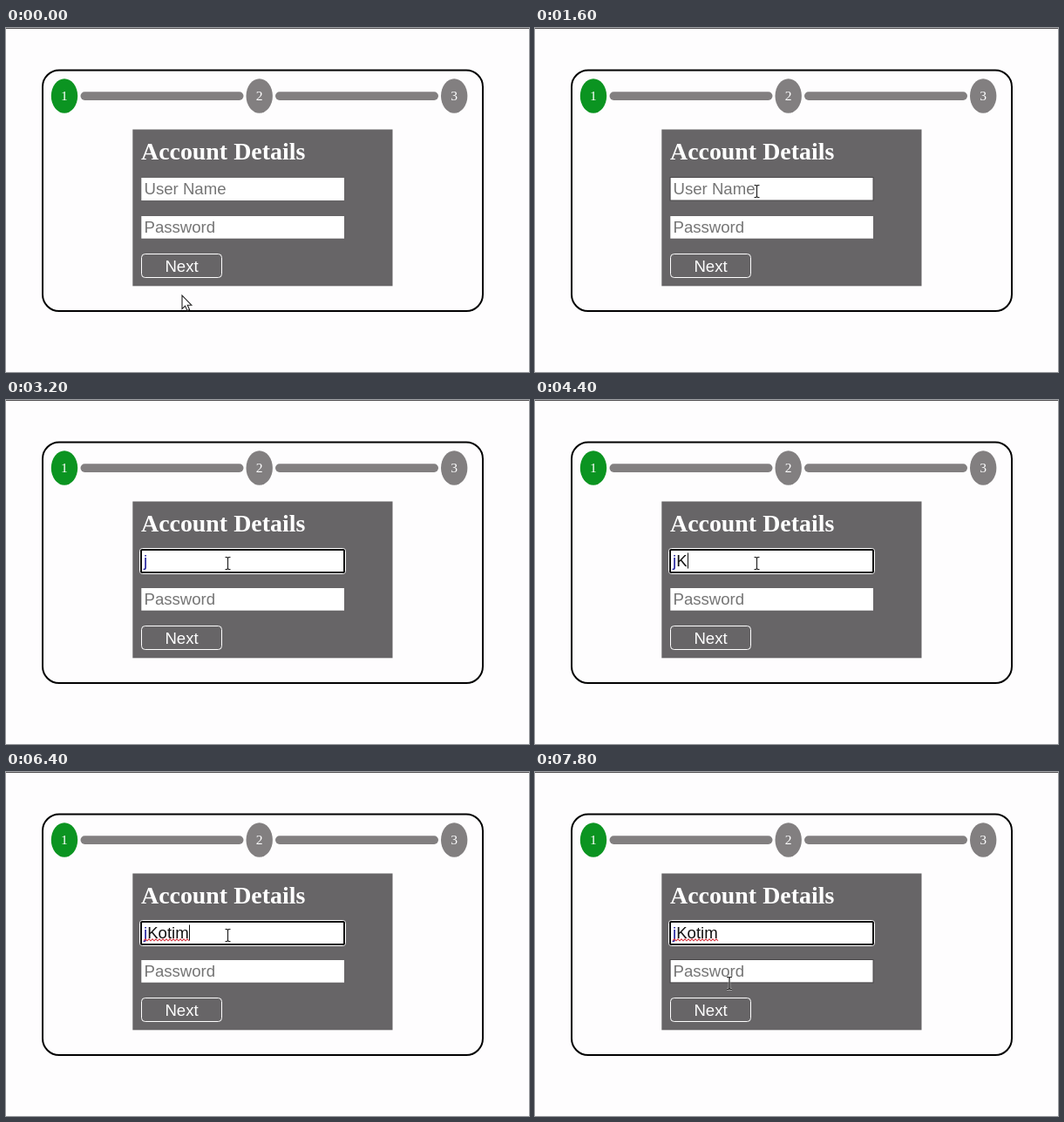
Write an HTML page that moves like this. It is 600 by 395 pixels and loops after 8000 ms.

```html
<!DOCTYPE html>
<html lang="en">
<head>
<meta charset="utf-8">
<title>Account form</title>
<style>
  html, body { margin: 0; width: 100%; height: 100%; overflow: hidden; background: #fefdfe; }
  svg { display: block; width: 100%; height: 100%; }
  text { font: 18.6px "Liberation Sans", Arial, sans-serif; fill: #757575; }
  .step text { font: 15.6px "Liberation Serif", "Times New Roman", serif; fill: #fff; text-anchor: middle; }
  .step, .bar { fill: #827f80; }
  .active { fill: #0b9421; }
  .title { font: bold 27.9px "Liberation Serif", "Times New Roman", serif; fill: #fff; }
  .field { fill: #fff; }
  .edge { fill: none; stroke: #4a484a; }
</style>
</head>
<body>
<svg viewBox="0 0 600 395">
  <rect width="600" height="1" fill="#555355"/>
  <rect x="42" y="48.5" width="505" height="276.5" rx="19" fill="none" stroke="#000" stroke-width="2"/>

  <rect class="bar" x="85.5" y="73.3" width="187" height="9.6" rx="4.8"/>
  <rect class="bar" x="309" y="73.3" width="187" height="9.6" rx="4.8"/>
  <g class="step active"><ellipse cx="67" cy="78" rx="15.2" ry="19.7"/><text x="67" y="83">1</text></g>
  <g class="step"><ellipse cx="290.7" cy="78" rx="15.2" ry="19.7"/><text x="290.7" y="83">2</text></g>
  <g class="step"><ellipse cx="514.2" cy="78" rx="15.2" ry="19.7"/><text x="514.2" y="83">3</text></g>

  <rect x="145.3" y="116.5" width="298.2" height="179.8" fill="#676567"/>
  <text class="title" x="155" y="151">Account Details</text>

  <rect class="field" x="155.3" y="172" width="232.7" height="26"/>
  <rect class="edge" id="userHover" x="155" y="171.5" width="233" height="26.5"/>
  <g id="focusRing" fill="none">
    <rect x="153.5" y="170.5" width="236" height="29" rx="3" stroke="#fff"/>
    <rect x="155" y="172" width="233" height="26" rx="1.5" stroke="#101010" stroke-width="2"/>
  </g>
  <text id="placeholder" x="158.5" y="191">User Name</text>
  <text id="entry" x="158" y="191"><tspan fill="#1c1c9c"></tspan><tspan fill="#111"></tspan></text>
  <path id="squiggle" fill="none" stroke="#d8404a" stroke-width="1.1"/>
  <rect id="caret" y="175.5" width="1" height="18" fill="#111"/>

  <rect class="field" x="155.3" y="216" width="232.7" height="25.7"/>
  <rect class="edge" id="passHover" x="155" y="215.5" width="233" height="26.5"/>
  <text x="158.5" y="235">Password</text>

  <rect x="155.5" y="259.5" width="92" height="27" rx="4" fill="none" stroke="#fff"/>
  <text x="201.5" y="279.5" text-anchor="middle" style="fill:#fff">Next</text>

  <g id="pointer">
    <path id="arrow" d="M0 0V15.5L3.6 12.2L6 17.6L8.6 16.5L6.2 11.2H10.8Z" fill="#fff" stroke="#222" stroke-width="1.1"/>
    <g id="beam" fill="none">
      <path d="M-3 -7H-1L0 -6L1 -7H3M0 -6V6M-3 7H-1L0 6L1 7H3" stroke="#fff" stroke-width="2.6" opacity=".5"/>
      <path d="M-3 -7H-1L0 -6L1 -7H3M0 -6V6M-3 7H-1L0 6L1 7H3" stroke="#222" stroke-width="1.2"/>
    </g>
  </g>
</svg>
<script>
const LOOP = 8000, FOCUS = 1800, SPELLCHECK = 5800;
const NAME = "jKotim";
const KEY_TIMES = [3200, 4400, 4600, 4800, 5000, 5200];
const $ = id => document.getElementById(id);
const show = (id, on) => $(id).setAttribute("visibility", on ? "visible" : "hidden");
const [firstLetter, otherLetters] = $("entry").children;

let wave = "M158 193.5";
for (let x = 160, up = true; x <= 210; x += 2, up = !up) wave += `L${x} ${up ? 191.8 : 193.8}`;
$("squiggle").setAttribute("d", wave);

function ease(t, start, end) {
  const p = Math.min(1, Math.max(0, (t - start) / (end - start)));
  return p * p * (3 - 2 * p);
}

function pointerAt(t) {
  const enter = ease(t, 200, 1200), leave = ease(t, 6800, 7750);
  return [202 + 52.5 * enter - 31.5 * leave, 307 - 119.5 * enter + 55 * leave];
}

function draw(t) {
  const typed = KEY_TIMES.filter(k => k <= t).length;
  firstLetter.textContent = NAME.slice(0, Math.min(1, typed));
  otherLetters.textContent = NAME.slice(1, Math.max(1, typed));
  show("placeholder", !typed);
  show("focusRing", t >= FOCUS);
  show("squiggle", t >= SPELLCHECK);

  // The caret restarts its blink on each key, with a short lag after the first.
  const blinkStart = typed === 1 ? 3400 : typed ? KEY_TIMES[typed - 1] : FOCUS;
  const sinceBlink = t - blinkStart;
  show("caret", sinceBlink >= 0 && sinceBlink % 1000 < 500);
  const width = typed ? $("entry").getComputedTextLength() : 0;
  $("caret").setAttribute("x", Math.round(158 + width));

  const [x, y] = pointerAt(t);
  const overUser = y > 172 && y < 198, overPass = y > 216 && y < 243;
  $("pointer").setAttribute("transform", `translate(${x} ${y})`);
  show("beam", overUser || overPass);
  show("arrow", !overUser && !overPass);
  show("userHover", overUser && t < FOCUS);
  show("passHover", overPass);
}

const begin = performance.now();
function tick() {
  draw((performance.now() - begin) % LOOP);
  requestAnimationFrame(tick);
}
tick();
</script>
</body>
</html>
```
